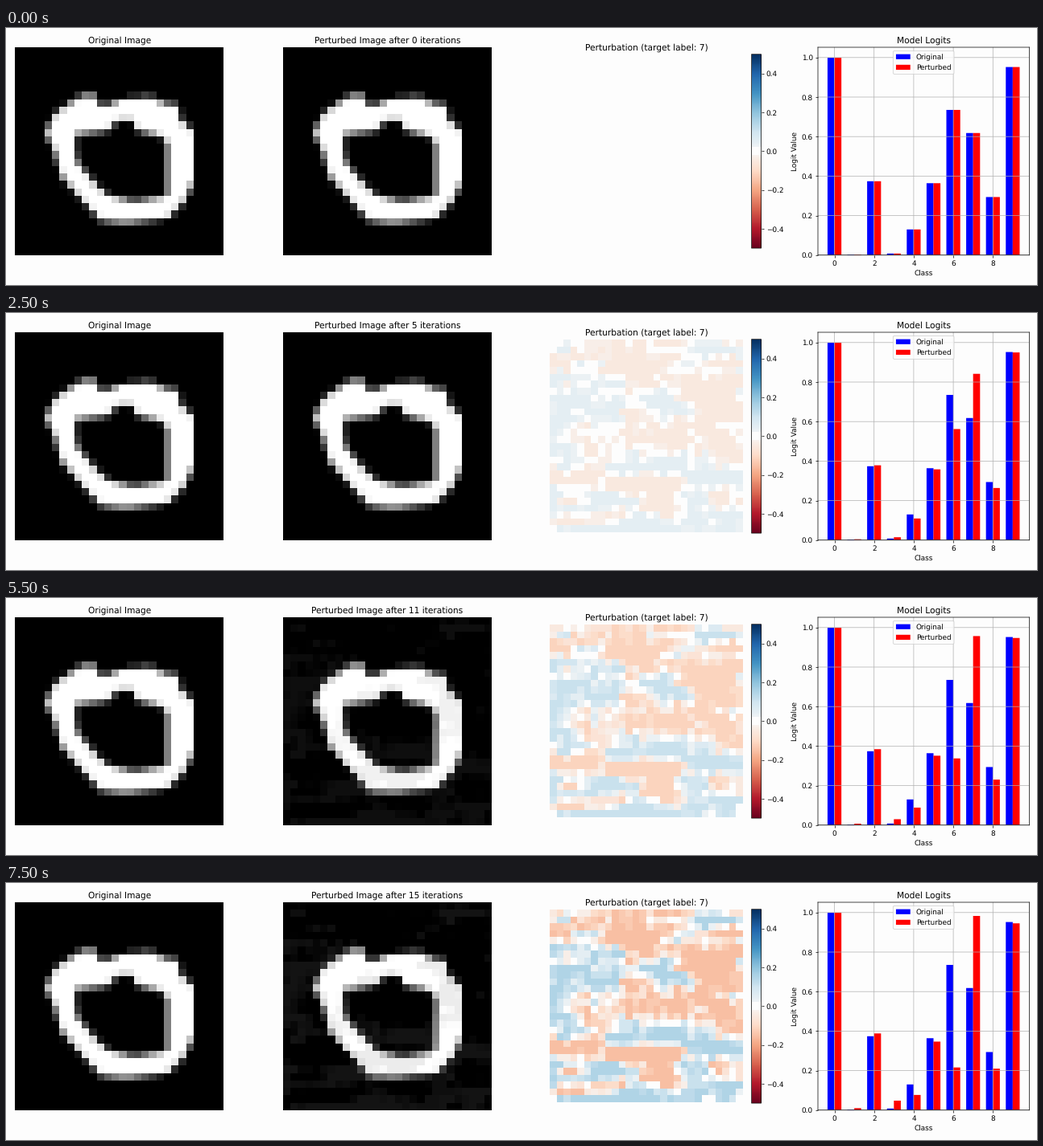
A matplotlib script for the animation above (8000 ms loop, 1280 by 320 pixels).

```python
import numpy as np
import matplotlib.pyplot as plt
from matplotlib.animation import FuncAnimation
from matplotlib.colors import ListedColormap, to_rgba
from matplotlib.path import Path

W, H, DPI = 1280, 320, 64
STEPS, EPS, N = 16, 0.01, 28
BG = "#fdfdfd"

# Corners of the hand-drawn ring, in image cells
OUTER = [(7, 7.7), (9, 6.5), (10.9, 6.5), (11.1, 7.75), (13, 7.7), (14, 7),
         (18.5, 6.7), (20, 7.6), (22, 7.75), (22.2, 9.8), (24, 11.3), (24, 18),
         (22.6, 21), (20.5, 23), (15, 23.6), (11.5, 23.3), (8.2, 19.6),
         (6.3, 17.5), (5.4, 14), (4.1, 11.5), (5.4, 9)]
INNER = [(8.15, 11.7), (12.5, 11.2), (13.8, 9.85), (15.8, 9.9), (16.3, 11.1),
         (19.5, 11.9), (20.5, 13), (20.5, 20), (16, 20.8), (12.5, 19.9),
         (10.9, 18.5), (8.2, 15.2)]

# Class scores and how fast their log-odds drift per iteration
SCORES = np.array([0.999, 0.003, 0.374, 0.008, 0.13, 0.364, 0.735, 0.618, 0.294, 0.952])
DRIFT = np.array([0, 0.08, 0.004, 0.122, -0.039, -0.005, -0.154, 0.238, -0.03, -0.009])


def make_digit(sub=8):
    """Rasterise the ring to N x N cells by area coverage."""
    g = (np.arange(N * sub) + 0.5) / sub
    pts = np.stack(np.meshgrid(g, g), -1).reshape(-1, 2)
    ring = Path(OUTER).contains_points(pts) & ~Path(INNER).contains_points(pts)
    return ring.reshape(N, sub, N, sub).mean(axis=(1, 3))


def make_perturbations():
    """Running sum of signed steps; cells with a weak gradient waver."""
    rng = np.random.default_rng(7)
    y, x = np.mgrid[:N, :N] + 0.5
    # Streaky noise, wider than it is high
    rough = rng.normal(size=(N + 1, N + 4))
    streaks = sum(rough[i:i + N, j:j + N] for i in range(2) for j in range(5))
    field = 0.35 + 0.6 * streaks / streaks.std()
    for cx, cy, rx, ry in [(11.5, 3, 5.5, 4), (24, 9.5, 4, 4.5),
                           (16, 21, 6, 1.5), (4.5, 20, 5, 1.5)]:
        field -= 1.6 * np.exp(-((x - cx) / rx) ** 2 - ((y - cy) / ry) ** 2)
    steps = np.sign(field + rng.normal(0, 0.4, (STEPS, N, N)))
    steps[0] = 0
    return EPS * steps.cumsum(axis=0)


def make_cmap():
    """RdBu with a plain background band around zero."""
    lut = plt.get_cmap("RdBu")(np.arange(256))
    lut[124:134] = to_rgba(BG)
    return ListedColormap(lut)


def perturbed_image(k):
    # The change is too faint to show in the early steps
    return np.clip(digit + 0.5 * noise[k], 0, 1) if k >= 10 else digit


def scores_at(k):
    odds = SCORES / (1 - SCORES) * np.exp(DRIFT * k)
    return odds / (1 + odds)


digit = make_digit()
noise = make_perturbations()

plt.rcParams.update({"font.family": "DejaVu Sans", "axes.facecolor": BG,
                     "path.snap": False, "text.hinting": "none"})
fig, axes = plt.subplots(1, 4, figsize=(W / DPI, H / DPI), dpi=DPI, facecolor=BG)
fig.subplots_adjust(left=9.6 / W, right=1 - 9.6 / W, top=1 - 24 / H,
                    bottom=1 - 282.8 / H, wspace=70.4 / 262.4)
ax_orig, ax_pert, ax_diff, ax_bar = axes

for ax in axes[:3]:
    ax.axis("off")
gray = dict(cmap="gray", vmin=0, vmax=1, interpolation="nearest")
ax_orig.imshow(digit, **gray)
ax_orig.set_title("Original Image")
im_pert = ax_pert.imshow(digit, **gray)
title = ax_pert.set_title("")

im_diff = ax_diff.imshow(noise[0], cmap=make_cmap(), vmin=-0.5, vmax=0.5,
                         interpolation="nearest")
ax_diff.set_title("Perturbation (target label: 7)")
fig.colorbar(im_diff, ax=ax_diff, fraction=0.046, pad=0.04)

classes, bw = np.arange(10), 0.35
ax_bar.bar(classes - bw / 2, SCORES, bw, color="blue", label="Original")
bars = ax_bar.bar(classes + bw / 2, SCORES, bw, color="red", label="Perturbed")
ax_bar.set(title="Model Logits", xlabel="Class", ylabel="Logit Value",
           ylim=(0, 1.052))
ax_bar.grid(True)
ax_bar.legend(loc="upper center")


def update(k):
    title.set_text(f"Perturbed Image after {k} iterations")
    im_pert.set_data(perturbed_image(k))
    im_diff.set_data(noise[k])
    for bar, score in zip(bars, scores_at(k)):
        bar.set_height(score)
    return [title, im_pert, im_diff, *bars]


anim = FuncAnimation(fig, update, frames=STEPS, interval=500, repeat=True,
                     repeat_delay=0, blit=False)
plt.show()
```
